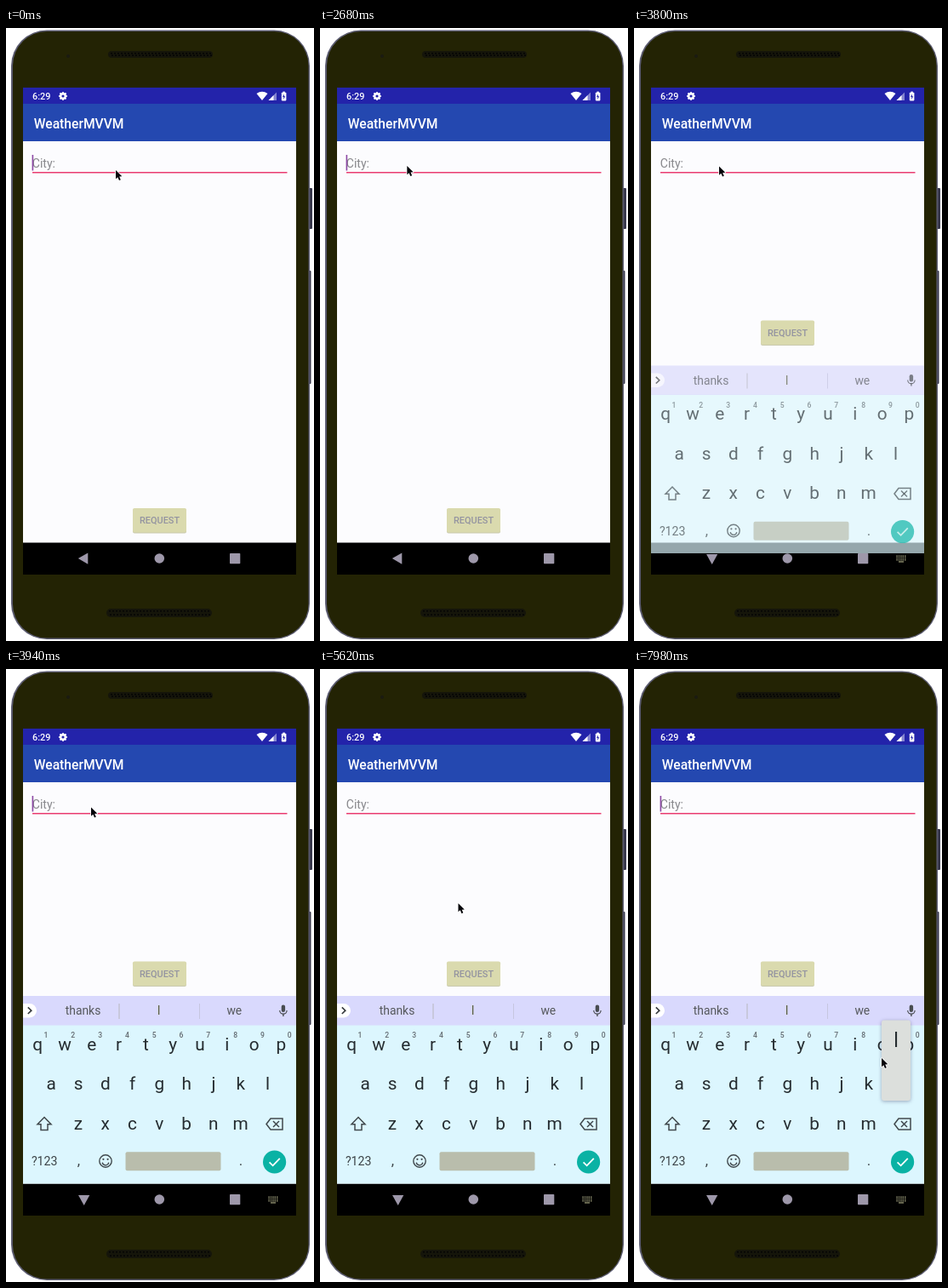
Recreate the animation shown at these times as an HTML page with a canvas. Size 362x720 px, loop 8000 ms.

```html
<!DOCTYPE html>
<html lang="en">
<head>
<meta charset="utf-8">
<title>Weather app</title>
<style>
html, body { margin: 0; width: 100%; height: 100%; overflow: hidden; background: #fff; }
canvas { display: block; width: 362px; height: 720px; }
</style>
</head>
<body>
<canvas id="stage"></canvas>
<script>
const W = 362, H = 720, LOOP = 8000;
const canvas = document.getElementById('stage');
const ctx = canvas.getContext('2d');
const ratio = window.devicePixelRatio || 1;
canvas.width = W * ratio;
canvas.height = H * ratio;

const SHIFT_AT = 3560, KEYS_AT = 3690, KEYS_MS = 220, POPUP_AT = 7640;

// Pointer positions: time, x, y
const pointerPath = [
  [0, 129, 167], [300, 129, 167], [1300, 110, 160.5], [2200, 110, 160.5],
  [2900, 100, 162.5], [5100, 100, 162.5], [6400, 277, 481.5], [6800, 277, 481.5],
  [7300, 306, 487], [7700, 306, 487], [7960, 291, 457], [8000, 291, 457]
];

function box(x, y, w, h, color, r = 0) {
  ctx.fillStyle = color;
  ctx.beginPath();
  ctx.roundRect(x, y, w, h, r);
  ctx.fill();
}

function disc(x, y, r, color) {
  ctx.fillStyle = color;
  ctx.beginPath();
  ctx.arc(x, y, r, 0, Math.PI * 2);
  ctx.fill();
}

function trace(points, close) {
  ctx.beginPath();
  points.forEach(([x, y]) => ctx.lineTo(x, y));
  if (close) ctx.closePath();
}

function shape(points, color) {
  trace(points, true);
  ctx.fillStyle = color;
  ctx.fill();
}

function line(points, color, width, close) {
  trace(points, close);
  ctx.strokeStyle = color;
  ctx.lineWidth = width;
  ctx.stroke();
}

function text(str, x, y, size, color, weight = 400, align = 'center') {
  ctx.font = `${weight} ${size}px Roboto, sans-serif`;
  ctx.textAlign = align;
  ctx.fillStyle = color;
  ctx.fillText(str, x, y);
}

function grille(x, y, w, h) {
  box(x, y, w, h, '#15150a', h / 2);
  for (let i = 3; i < w - 2; i += 4) {
    box(x + i, y + 2, 2, 1.5, '#050504');
    box(x + i + 1, y + h - 3.5, 2, 1.5, '#050504');
  }
}

function drawPhone() {
  box(355, 188, 5, 48, '#38384c', 1);
  box(355, 285, 3.5, 133, '#38384c', 1);
  box(6, 2.5, 351, 715.5, '#5b5b70', 42);
  box(8, 4, 347.5, 712.5, '#232304', 40);
  grille(120, 27, 123, 8);
  grille(118, 682, 124, 10);
  disc(73, 33, 2, '#1b1b12');
}

function drawStatus() {
  box(20, 70, 321, 19, '#2323aa');
  text('6:29', 31, 84, 10.9, '#fff', 500, 'left');
  disc(67, 80, 3.9, '#fff');
  for (let i = 0; i < 8; i++) {
    const a = i * Math.PI / 4;
    disc(67 + Math.cos(a) * 4, 80 + Math.sin(a) * 4, 1.1, '#fff');
  }
  disc(67, 80, 1.6, '#2323aa');
  ctx.fillStyle = '#fff';
  ctx.beginPath();
  ctx.moveTo(301, 85);
  ctx.lineTo(294.5, 77);
  ctx.quadraticCurveTo(301, 72.5, 307.5, 77);
  ctx.fill();
  shape([[308.5, 85], [318, 85], [318, 75.5]], '#8585d0');
  shape([[308.5, 85], [314.5, 85], [314.5, 79]], '#fff');
  box(323.8, 75.8, 5.6, 9.6, '#fff', 0.8);
  box(325.4, 74.6, 2.4, 2, '#fff');
  shape([[327, 77.5], [325, 81], [326.4, 81], [326.2, 84], [328.2, 80.2], [326.9, 80.2]], '#2323aa');
}

function drawApp(t) {
  box(20, 70, 321, 572, '#fcfcfe');
  drawStatus();
  box(20, 89, 321, 44, '#2448b0');
  text('WeatherMVVM', 32.7, 117.6, 15.65, '#fff', 500, 'left');

  text('City:', 30.8, 164, 14.05, '#88888c', 400, 'left');
  box(31, 169, 299.5, 1.6, '#ea3c70');
  const tapped = t > 3150 && t < 3900;
  if (!tapped && (t + 350) % 1000 < 500) box(30.6, 149, 1.6, 18.5, '#8c48a4');

  const y = t < SHIFT_AT ? 564 : 343.5;
  box(149, y + 0.8, 63, 28.6, '#c9c9ae', 2);
  box(149, y, 63, 28.4, '#dadaae', 2);
  text('REQUEST', 180.5, y + 18.3, 10.95, '#9494a0', 500);
}

function drawNav(t) {
  const gray = '#9e98aa';
  box(20, 604.5, 321, 37.5, '#000');
  if (t < SHIFT_AT) {
    shape([[84.8, 623], [96.3, 616.5], [96.3, 629.7]], gray);
  } else {
    shape([[85, 618], [98.3, 618], [91.7, 630]], gray);
    for (let r = 0; r < 3; r++)
      for (let c = 0; c < 5; c++) box(308.4 + c * 2.4, 619.5 + r * 2.3, 1.4, 1.4, '#9a9a78');
    box(311, 626.3, 6, 1.3, '#9a9a78');
  }
  disc(180.3, 623, 5.8, gray);
  box(263, 617, 12.3, 12.3, gray, 0.8);
}

function keyRow(letters, x, y) {
  [...letters].forEach((ch, i) => text(ch, x + i * 31.8, y, 20.8, '#252c30'));
}

function drawSuggestions() {
  box(20, 384, 321, 34.5, '#d9d9fd');
  ctx.save();
  ctx.beginPath();
  ctx.rect(20, 384, 321, 34);
  ctx.clip();
  box(10, 393, 26, 16.5, '#fff', 8.2);
  ctx.restore();
  line([[25.8, 397.4], [29.8, 401.2], [25.8, 405]], '#33373a', 1.6);
  text('thanks', 90.5, 406.2, 13.9, '#55585c');
  text('I', 179.7, 406.2, 13.9, '#5c6040');
  text('we', 268.3, 406.2, 13.9, '#55585c');
  box(132.5, 393, 1, 18, '#b7b7bd');
  box(227, 393, 1, 18, '#c6c6df');

  box(323.7, 394.5, 4.4, 8.5, '#484c50', 2.2);
  ctx.strokeStyle = '#484c50';
  ctx.lineWidth = 1.2;
  ctx.beginPath();
  ctx.arc(325.9, 401, 4.2, 0, Math.PI);
  ctx.stroke();
  box(325.2, 405, 1.4, 3, '#484c50');
}

function drawKeyIcons() {
  const ink = '#40484c';
  line([[45, 526.5], [53, 534.8], [49, 534.8], [49, 541.5], [41, 541.5], [41, 534.8], [37, 534.8]], ink, 1.5, true);
  line([[306, 534.5], [311, 528], [325, 528], [325, 541], [311, 541]], ink, 1.5, true);
  line([[314, 531], [321, 538]], ink, 1.5);
  line([[321, 531], [314, 538]], ink, 1.5);

  ctx.strokeStyle = ink;
  ctx.lineWidth = 1.4;
  ctx.beginPath();
  ctx.arc(117, 578, 7.2, 0, Math.PI * 2);
  ctx.stroke();
  ctx.beginPath();
  ctx.arc(117, 579, 3.8, 0.15, Math.PI - 0.15);
  ctx.stroke();
  disc(114.4, 575.8, 1.1, ink);
  disc(119.6, 575.8, 1.1, ink);

  disc(315.6, 579, 13.6, '#0ab2a4');
  line([[309.6, 579.4], [313.6, 583.3], [321.8, 574.8]], '#fff', 1.8);
}

function drawKeyboard(t) {
  if (t < KEYS_AT) return;
  const p = Math.min(1, (t - KEYS_AT) / KEYS_MS);
  ctx.save();
  ctx.beginPath();
  ctx.rect(20, 70, 321, 572);
  ctx.clip();
  ctx.globalAlpha = Math.min(1, 0.3 + p * 0.75);
  ctx.translate(0, 51 * (1 - p) ** 2);
  box(20, 418, 321, 186.5, '#dcf6fe');
  drawSuggestions();
  keyRow('qwertyuiop', 37.2, 447.8);
  [...'1234567890'].forEach((n, i) => text(n, 47 + i * 31.8, 433, 8.6, '#626a70', 500));
  keyRow('asdfghjkl', 53.2, 494.3);
  keyRow('zxcvbnm', 84.8, 540.8);
  text('?123', 45.2, 583.4, 14.2, '#3c4448');
  text(',', 85.3, 583.4, 17, '#3c4448');
  text('.', 276, 583.4, 17, '#3c4448');
  box(140.5, 567.3, 112, 22, '#b9bdac', 2);
  drawKeyIcons();
  ctx.restore();
}

function drawPopup(t) {
  if (t < POPUP_AT) return;
  ctx.save();
  ctx.shadowColor = 'rgba(50,50,90,.4)';
  ctx.shadowBlur = 4 * ratio;
  ctx.shadowOffsetY = ratio;
  box(291, 412.5, 34, 94.5, '#dcdfdc', 3);
  ctx.restore();
  text('l', 308, 443.5, 23, '#252c30');
}

function drawPointer(t) {
  const i = pointerPath.findIndex(k => k[0] > t);
  const [t0, x0, y0] = pointerPath[i - 1];
  const [t1, x1, y1] = pointerPath[i];
  const u = (t - t0) / (t1 - t0);
  const e = u * u * (3 - 2 * u);
  ctx.save();
  ctx.translate(x0 + (x1 - x0) * e, y0 + (y1 - y0) * e);
  const arrow = [[0, 0], [0, 10.2], [2.3, 8.2], [4, 12], [5.8, 11.2], [4.2, 7.5], [7.3, 7.3]];
  ctx.lineJoin = 'round';
  line(arrow, '#fff', 1.6, true);
  shape(arrow, '#05050a');
  ctx.restore();
}

function frame(now) {
  const t = now % LOOP;
  ctx.setTransform(ratio, 0, 0, ratio, 0, 0);
  box(0, 0, W, H, '#fff');
  drawPhone();
  drawApp(t);
  drawNav(t);
  drawKeyboard(t);
  drawPopup(t);
  drawPointer(t);
}

const start = performance.now();
function tick() {
  frame(performance.now() - start);
  requestAnimationFrame(tick);
}
tick();
</script>
</body>
</html>
```
